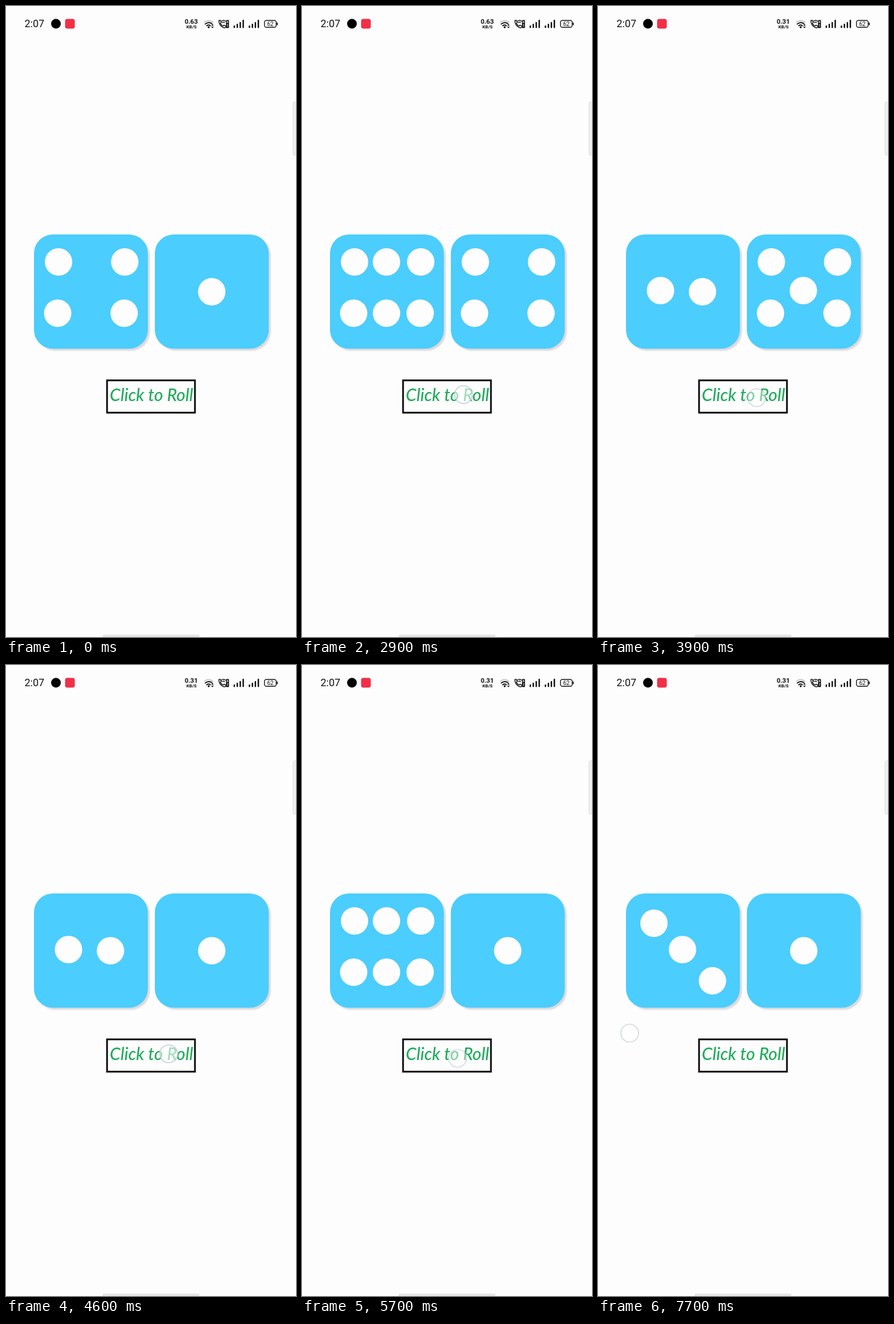
Recreate the animation shown at these times as an HTML page. Size 508x1102 px, loop 7800 ms.

```html
<!DOCTYPE html>
<html lang="en">
<head>
<meta charset="utf-8">
<title>Dice roller</title>
<style>
  html, body { margin: 0; width: 100%; height: 100%; overflow: hidden; background: #fefdfe; }
  svg { display: block; width: 508px; height: 1102px; }
  text { font-family: Roboto, sans-serif; fill: #111; }
  .small { font-weight: 700; text-anchor: middle; }
  .label { font: italic 500 30px Lato, sans-serif; fill: #22ab5c; text-anchor: middle; }
  .line { fill: none; stroke: #111; stroke-width: 1.8; stroke-linecap: round; }
</style>
</head>
<body>
<svg viewBox="0 0 508 1102">
  <defs>
    <filter id="soft" x="-10%" y="-10%" width="120%" height="120%"><feGaussianBlur stdDeviation="1"/></filter>
    <g id="bars" fill="#111">
      <rect y="34" width="2.5" height="4.5" rx="1"/>
      <rect x="5.2" y="31" width="2.5" height="7.5" rx="1"/>
      <rect x="10.4" y="28" width="2.5" height="10.5" rx="1"/>
      <rect x="15.6" y="24" width="2.5" height="14.5" rx="1"/>
    </g>
    <g id="body">
      <rect x="53" y="403" width="199" height="199" rx="33" fill="#dcd9da" filter="url(#soft)"/>
      <rect x="49" y="399" width="199.5" height="199.5" rx="33" fill="#4bcdfd"/>
    </g>
  </defs>

  <!-- status bar -->
  <text x="32.5" y="37.3" font-size="18">2:07</text>
  <circle cx="87.5" cy="31" r="8.5"/>
  <rect x="103.5" y="22.5" width="17" height="17" rx="4" fill="#f03048"/>
  <text id="speed" class="small" x="324.5" y="31" font-size="11.5"></text>
  <text class="small" x="325" y="39" font-size="8">KB/S</text>
  <path class="line" stroke-linecap="butt" d="M347.5 28.5Q355 22.5 362.5 28.5" style="stroke:#c8c8c8"/>
  <path class="line" d="M349 31.5Q355 26.8 361 31M351.5 34.5Q355 32 358 34.5" stroke-width="2"/>
  <circle cx="355" cy="37" r="1.7"/>
  <path d="M359.5 34.2l2.2-2.7 2.2 2.7zm0 1.8l2.2 2.7 2.2-2.7z"/>
  <path class="line" d="M373 25.5l2-.6 2 3.6-1.4 1.9q1.5 3.2 4.6 4.5l1.8-1.5 3.3 1.7-.5 2.3q-2.3 1.7-6-.7-6-4-5.8-11.2z" style="stroke-width:1.5"/>
  <path class="line" d="M377.5 26.4q3.6-2.8 7 0M379 29q2-1.6 4 0" style="stroke-width:1.5"/>
  <rect x="385.5" y="24.5" width="5" height="14" rx="1.2"/>
  <path d="M387.3 26.5h1.4v3h-1.4zm-.3 6h2l-2 3.5h2" fill="none" stroke="#fff" stroke-width=".8"/>
  <use href="#bars" x="398.7"/>
  <use href="#bars" x="425.2"/>
  <rect class="line" x="452.7" y="25.2" width="20.6" height="12" rx="3.5" style="stroke-width:1.4"/>
  <path class="line" d="M475.2 29.7v3"/>
  <text x="463" y="34.9" font-size="10" text-anchor="middle">62</text>

  <!-- system handles -->
  <rect x="502.5" y="167.5" width="9" height="93" rx="2.5" fill="#f0eff0" stroke="#dedde0"/>
  <rect x="169" y="1097.5" width="170" height="9" rx="4" fill="#e8e7e8"/>

  <use href="#body"/>
  <g id="left" fill="#fefdfe"></g>
  <g transform="translate(211.7)">
    <use href="#body"/>
    <g id="right" fill="#fefdfe"></g>
  </g>

  <rect x="177" y="653.8" width="154" height="56.4" fill="none" stroke="#080808" stroke-width="3"/>
  <text class="label" x="254.8" y="690">Click to Roll</text>

  <circle id="touch" r="15.5" fill="#fff" fill-opacity=".58" stroke="#c6d0d8" stroke-width="2.2" stroke-opacity=".85"/>
</svg>
<script>
const LOOP = 7800, STEP = 100;
const byId = id => document.getElementById(id);

const corners = [[92, 447], [208, 447], [90.5, 536.5], [207, 536.5]];
const centre = [148, 497];
const faces = {
  1: [[148.7, 499]],
  2: [[109.5, 497], [183, 499]],
  3: [[98, 451], centre, [200.5, 551.5]],
  4: corners,
  5: [...corners, centre],
  6: [...corners, [148, 447], [148, 536.5]]
};

// [time, left value, right value]
const rolls = [
  [0, 4, 1], [2200, 6, 4], [3000, 2, 2], [3600, 2, 5],
  [4300, 2, 1], [4700, 1, 4], [5300, 6, 1], [6000, 3, 1]
];

// [start, end, x, y]
const taps = [
  [2200, 2600, 278, 685], [2800, 3200, 283, 678.5], [3400, 3600, 265, 693],
  [3700, 4100, 278, 684], [4100, 4400, 280, 680], [4500, 4900, 285, 679],
  [5100, 5400, 283, 682], [5500, 5800, 272.5, 687], [5900, 6300, 281, 676],
  [7600, 7800, 55.5, 643]
];

function showFace(id, value) {
  const die = byId(id);
  if (die.dataset.value === String(value)) return;
  die.dataset.value = value;
  die.innerHTML = faces[value].map(([x, y]) => `<circle cx="${x}" cy="${y}" r="24"/>`).join("");
}

function showTouch(t) {
  const tap = taps.find(([start, end]) => t >= start && t < end);
  const touch = byId("touch");
  touch.style.display = tap ? "" : "none";
  if (!tap) return;
  const [start, end, x, y] = tap;
  touch.setAttribute("transform", `translate(${x} ${y})`);
  touch.setAttribute("opacity", t === start || end - t <= 2 * STEP ? 0.75 : 1);
}

function draw() {
  const t = Math.floor(performance.now() % LOOP / STEP) * STEP;
  const [, left, right] = rolls.findLast(([time]) => time <= t);
  showFace("left", left);
  showFace("right", right);
  byId("speed").textContent = t < 3600 ? "0.63" : "0.31";
  showTouch(t);
  requestAnimationFrame(draw);
}
draw();
</script>
</body>
</html>
```
